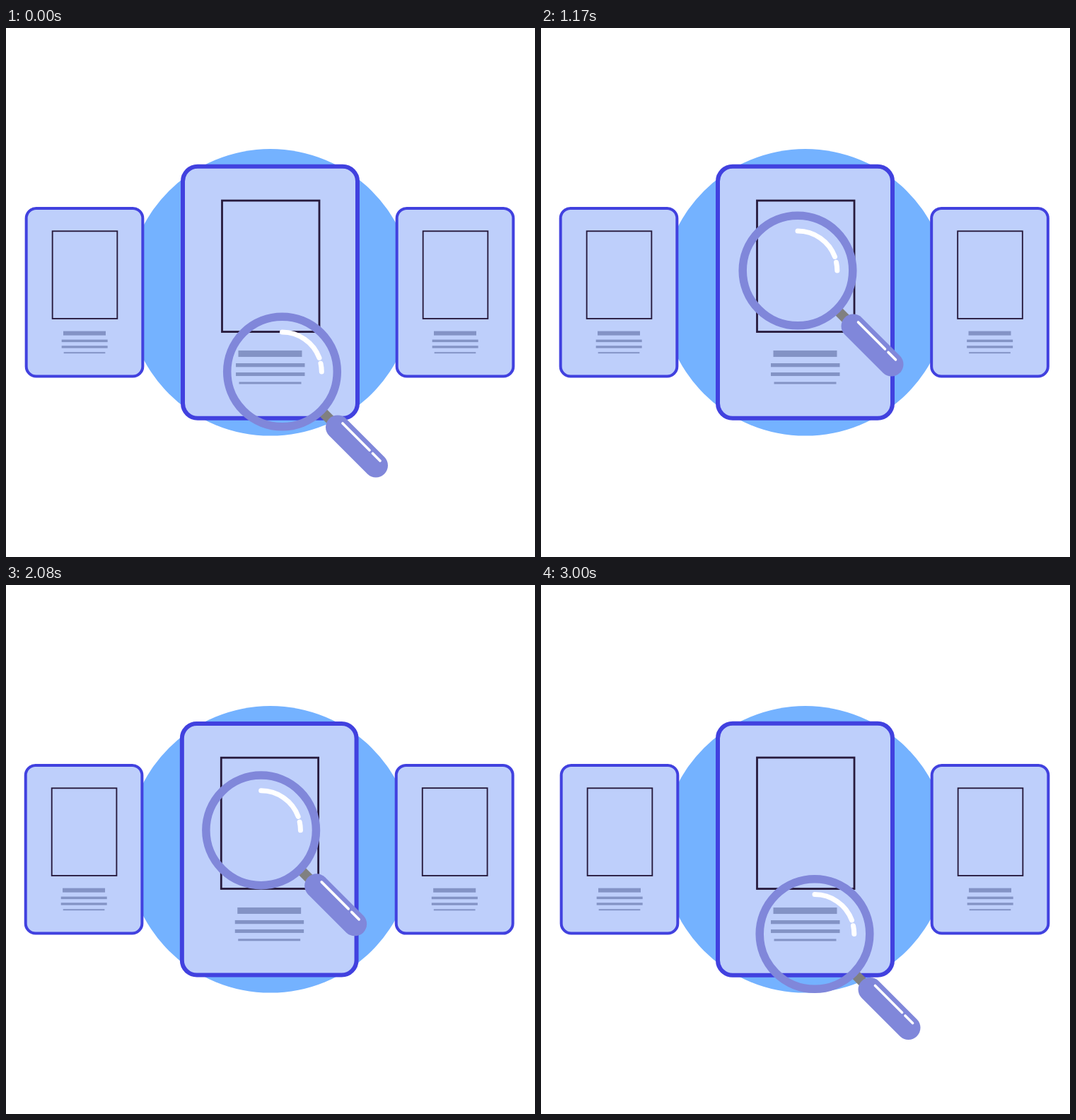
An HTML page that plays this animation: 748x748 px, repeating every 3.04 s.

```html
<!DOCTYPE html>
<html lang="en">
<head>
<meta charset="utf-8">
<title>Card search</title>
<style>
  html, body { margin: 0; width: 100%; height: 100%; overflow: hidden; background: #fff; }
  svg { display: block; width: 100vw; height: 100vh; }
</style>
</head>
<body>
<svg viewBox="0 0 748 748">
  <defs>
    <g id="card">
      <rect x="-123.5" y="-178" width="247" height="356" rx="21" fill="#becffb" stroke="#4141df" stroke-width="6"/>
      <rect x="-68" y="-129.7" width="137.5" height="185.5" fill="none" stroke="#271a3c" stroke-width="2.8"/>
      <g fill="#8393c5">
        <rect x="-45" y="82.3" width="90" height="9"/>
        <rect x="-48.5" y="100.3" width="97.5" height="5.3"/>
        <rect x="-48.5" y="113.3" width="97.5" height="5"/>
        <rect x="-44" y="126.7" width="88" height="3"/>
      </g>
    </g>
  </defs>
  <circle cx="373.8" cy="373.8" r="202.8" fill="#74b2ff"/>
  <g id="cards">
    <use href="#card"/><use href="#card"/><use href="#card"/><use href="#card"/>
  </g>
  <g id="lens" fill="none" stroke-linecap="round">
    <path d="M57 57L74 74" stroke="#808080" stroke-width="14" stroke-linecap="butt"/>
    <circle r="77.8" stroke="#8087da" stroke-width="11.5"/>
    <path d="M78.5 78.5L132.5 132.5" stroke="#8087da" stroke-width="34"/>
    <g stroke="#fff">
      <path d="M0 -56A56 56 0 0 1 52.5 -19.5M54.5 -11.8A56 56 0 0 1 55.8 0" stroke-width="7"/>
      <path d="M85.5 73L123.5 111M128 115.5L138.5 126" stroke-width="3.6"/>
    </g>
  </g>
</svg>
<script>
const LOOP = 3040, TICK = 1000 / 24, TICKS = 73, CENTER_Y = 373.75;
const SMALL = 2 / 3, SLIDE = 13.6;

// Stops of the wandering lens: [tick, x, y]
const stops = [[0, 390.5, 486], [9, 464.5, 286], [18, 335, 317], [28, 363, 343],
  [45, 378.5, 320], [56, 341.5, 385.5], [66, 362, 424], [72, 387, 493.5]];

const cards = [...document.querySelectorAll('#cards use')];
const lens = document.getElementById('lens');

const clamp = x => Math.min(1, Math.max(0, x));
const mix = (a, b, t) => a + (b - a) * t;

// Ease in and out, quicker at the start
function slide(ticks) {
  const x = clamp(ticks / SLIDE) ** .734;
  return x * x * (3 - 2 * x);
}

// Smooth closed curve through the stops; dim 1 is x, dim 2 is y
function wander(tick, dim) {
  const count = stops.length;
  const stop = i => {
    const lap = Math.floor(i / count), s = stops[i - lap * count];
    return [s[0] + lap * TICKS, s[dim]];
  };
  const slope = i => (stop(i + 1)[1] - stop(i)[1]) / (stop(i + 1)[0] - stop(i)[0]);
  const tangent = i => {
    const before = stop(i)[0] - stop(i - 1)[0], after = stop(i + 1)[0] - stop(i)[0];
    return (slope(i - 1) * after + slope(i) * before) / (before + after);
  };
  let i = 0;
  while (i + 1 < count && stops[i + 1][0] <= tick) i++;
  const [t0, a] = stop(i), [t1, b] = stop(i + 1);
  const span = t1 - t0, s = (tick - t0) / span, r = 1 - s;
  return mix(a, b, s * s * (3 - 2 * s)) + span * s * r * (tangent(i) * r - tangent(i + 1) * s);
}

function place(node, x, y, scale = 1) {
  node.setAttribute('transform', `translate(${x} ${y}) scale(${scale})`);
}

function draw(time) {
  let tick = Math.min(TICKS - 1, Math.floor((time % LOOP + 5) / TICK));
  if (tick % 18 === 1 && tick < 60) tick--; // every 18th picture is held twice as long

  // The carousel goes one place left and back; the outer cards swing slightly past their rest.
  const u = slide(tick - 2) - slide(tick - 37);
  const outer = u - .007 * Math.sin(Math.PI * clamp((tick - 50) / 22));

  place(cards[0], mix(111, -193, outer), CENTER_Y, SMALL);
  place(cards[1], mix(373.5, 110, u + .585 * u * (1 - u)), CENTER_Y, mix(1, SMALL, u));
  place(cards[2], mix(635, 373.5, outer), CENTER_Y, mix(SMALL, 1, outer));
  place(cards[3], mix(979, 634.5, u), CENTER_Y, SMALL);
  place(lens, wander(tick, 1), wander(tick, 2));
}

const start = performance.now();
function loop() {
  draw(performance.now() - start);
  requestAnimationFrame(loop);
}
loop();
</script>
</body>
</html>
```
